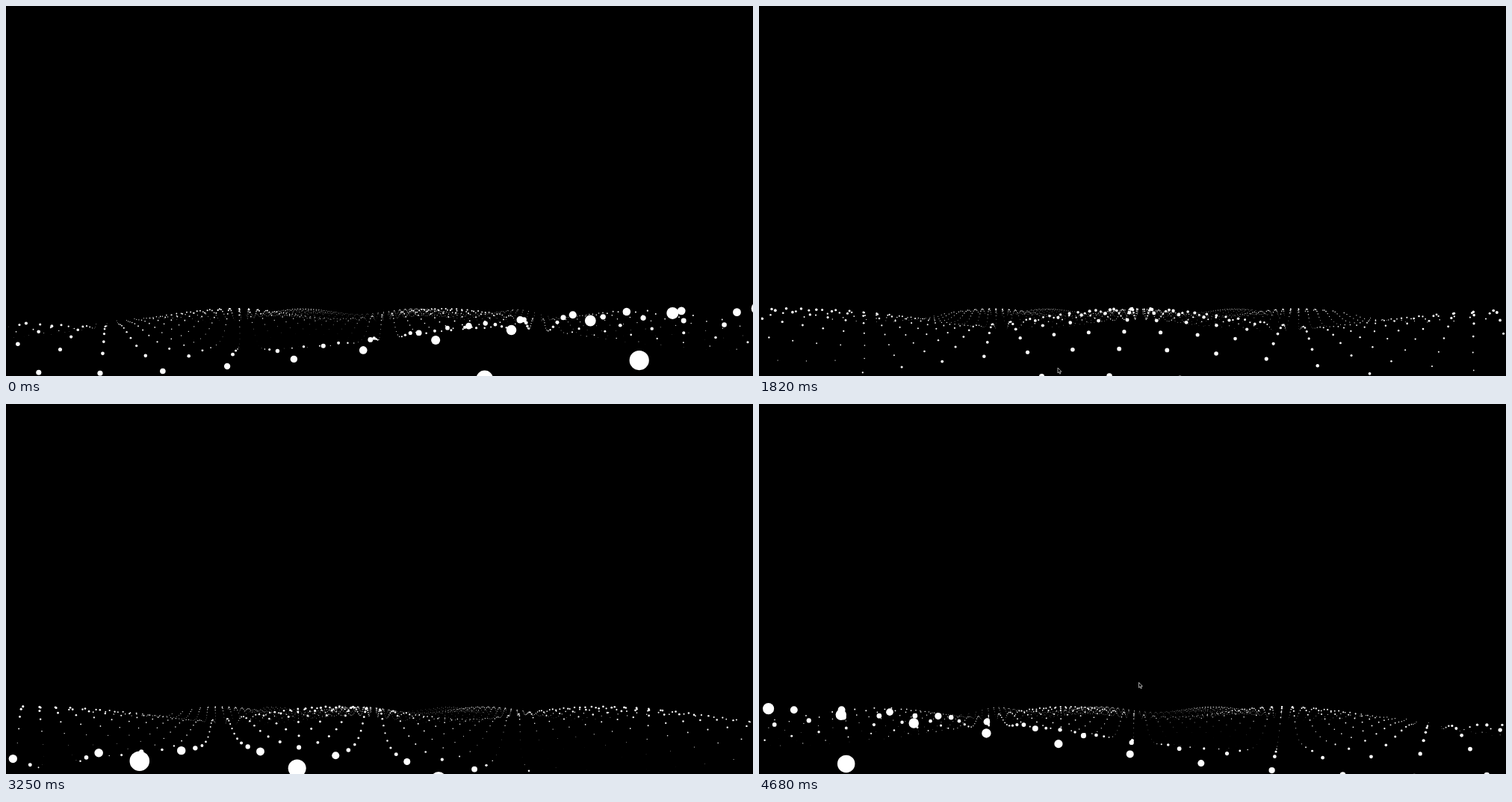
An HTML page with a canvas for the animation above (4810 ms loop, 1000x495 px).

```html
<!DOCTYPE html>
<html lang="en">
<head>
<meta charset="utf-8">
<title>Particle waves</title>
<style>
html, body { margin: 0; width: 100%; height: 100%; overflow: hidden; background: #000; }
canvas { display: block; width: 100%; height: 100%; }
</style>
</head>
<body>
<canvas id="stage"></canvas>
<script>
const W = 1000, H = 495, LOOP = 4810, STEP = 130;
const GRID = 50, GAP = 100;
const FOCAL = 196, MID_X = 501.5, MID_Y = 424.3;
const CAM_Y = 97.4, CAM_Z = 1000;

// time, wave phase, camera x
const KEYS = [
  [0, -4.74, 30.5], [650, -2.27, 119], [1300, -0.31, 200], [2340, 2.38, -35],
  [3250, 4.31, -47], [3770, 5.67, -10], [4680, 7.67, 6.3]
];
// time, pointer x, pointer y
const POINTER = [
  [0, 580, 530], [520, 648, 500], [650, 652.5, 489.5], [780, 690, 500], [1040, 740, 510],
  [1170, 620, 497], [1300, 507.5, 479], [1820, 400, 484], [2340, 417, 486],
  [2600, 430, 500], [3770, 520, 520], [4030, 516, 470], [4420, 508.5, 372.5], [4680, 508.5, 372.5]
];

const canvas = document.getElementById("stage");
const ctx = canvas.getContext("2d");
const scale = window.devicePixelRatio || 1;
canvas.width = W * scale;
canvas.height = H * scale;

function segment(keys, t) {
  let i = 0;
  while (i < keys.length - 2 && t >= keys[i + 1][0]) i++;
  const a = keys[i], b = keys[i + 1];
  return { a, b, u: (t - a[0]) / (b[0] - a[0]) };
}

const mix = (a, b, u) => a + (b - a) * u;

// The camera closes 5% of the gap to its goal for every 0.1 of wave phase.
function pose(t) {
  const { a, b, u } = segment(KEYS, t);
  const left = phase => Math.pow(0.95, phase * 10);
  const span = b[1] - a[1];
  const goal = (b[2] - a[2] * left(span)) / (1 - left(span));
  return { phase: a[1] + span * u, camX: goal + (a[2] - goal) * left(span * u) };
}

function drawWaves({ phase, camX }) {
  const ground = Math.hypot(camX, CAM_Z);
  const dist = Math.hypot(ground, CAM_Y);
  ctx.fillStyle = "#fff";
  for (let ix = 0; ix < GRID; ix++) {
    const waveX = Math.sin((ix + phase) * 0.3);
    const dx = (ix - GRID / 2) * GAP - camX;
    for (let iz = 0; iz < GRID; iz++) {
      const sum = waveX + Math.sin((iz + phase) * 0.5);
      const dy = sum * 50 - CAM_Y;
      const dz = (iz - GRID / 2) * GAP - CAM_Z;
      const ahead = -(camX * dx + CAM_Z * dz) / ground;
      const depth = (ahead * ground - dy * CAM_Y) / dist;
      if (depth < 1) continue;
      const zoom = FOCAL / depth;
      const x = MID_X + zoom * (CAM_Z * dx - camX * dz) / ground;
      const y = MID_Y - zoom * (dy * ground + ahead * CAM_Y) / dist;
      const r = zoom * 2 * (sum + 2);
      if (x + r < 0 || x - r > W || y - r > H) continue;
      ctx.beginPath();
      ctx.arc(x, y, r, 0, Math.PI * 2);
      ctx.fill();
    }
  }
}

function drawPointer(t) {
  const { a, b, u } = segment(POINTER, t);
  ctx.save();
  ctx.translate(mix(a[1], b[1], u), mix(a[2], b[2], u));
  const arrow = new Path2D("M0 0V7L1.6 5.6L2.7 8.2L3.8 7.7L2.7 5.2H4.9Z");
  ctx.fillStyle = "#000";
  ctx.fill(arrow);
  ctx.strokeStyle = "#ccc";
  ctx.lineWidth = 0.8;
  ctx.stroke(arrow);
  ctx.restore();
}

function draw(now) {
  const t = Math.floor((now % LOOP) / STEP) * STEP;
  ctx.setTransform(scale, 0, 0, scale, 0, 0);
  ctx.fillStyle = "#000";
  ctx.fillRect(0, 0, W, H);
  ctx.save();
  ctx.beginPath();
  ctx.rect(3, 0, W - 3, H);
  ctx.clip();
  drawWaves(pose(t));
  drawPointer(t);
  ctx.restore();
}

const start = performance.now();
function tick() {
  draw(performance.now() - start);
  requestAnimationFrame(tick);
}
tick();
</script>
</body>
</html>
```
